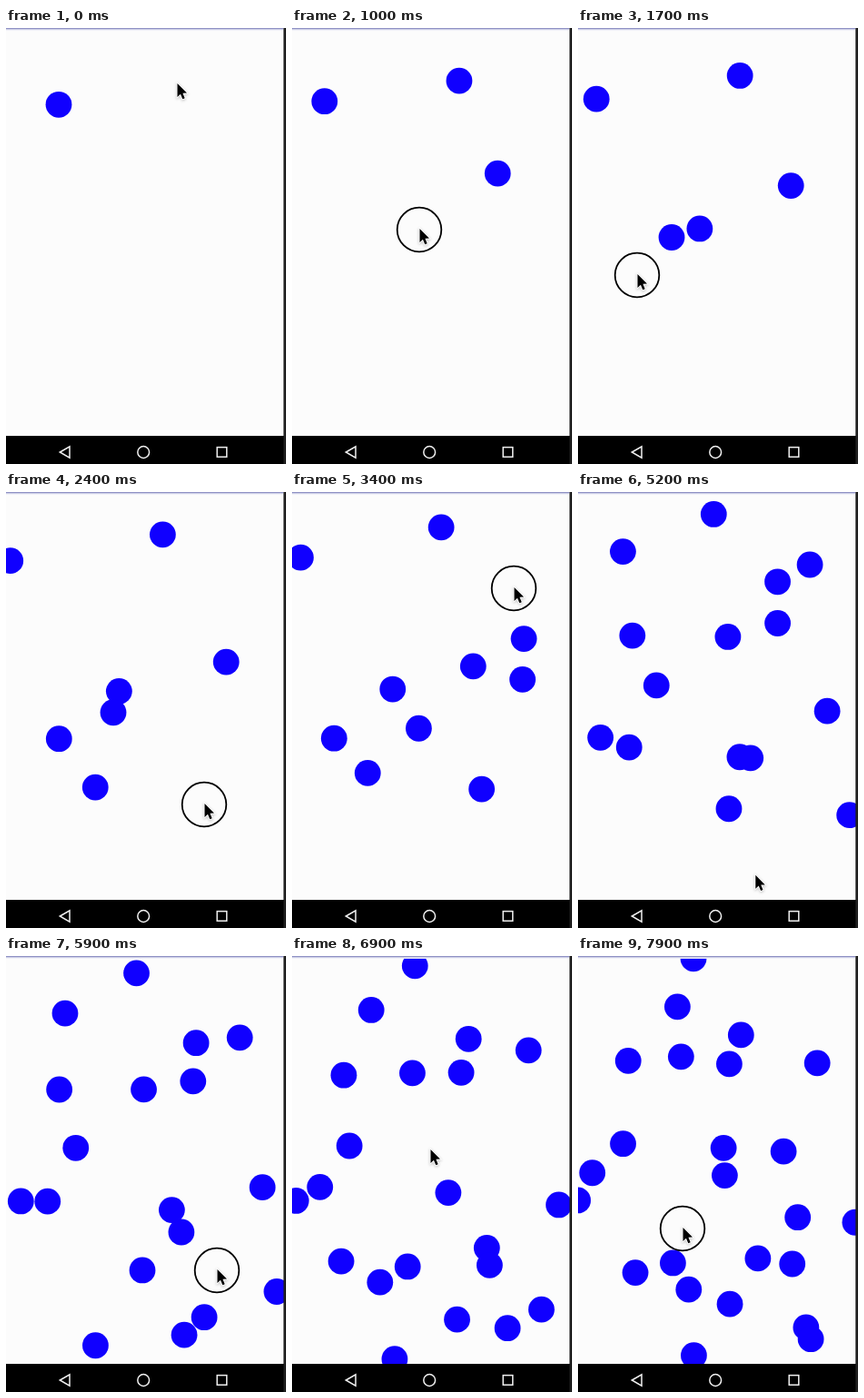
Write an HTML page with a canvas that moves like this. It is 308 px wide and 480 px high and loops after 8000 ms.

```html
<!DOCTYPE html>
<html lang="en">
<head>
<meta charset="utf-8">
<title>Tap to add balls</title>
<style>
html, body { margin: 0; width: 100%; height: 100%; overflow: hidden; background: #fcfcfc; }
canvas { display: block; }
</style>
</head>
<body>
<canvas id="stage" width="308" height="480"></canvas>
<script>
const ctx = document.getElementById('stage').getContext('2d');
const LOOP = 8000, STEP = 100;
const LAG = 0.3;    // seconds from a press to the ball's appearance
const HOLD = 0.2;   // seconds the touch ring stays
const REST = 0.05;  // the pointer arrives this long before the press

// About three taps a second, in a slightly uneven rhythm.
const pressTime = n => n / 3 - 0.1 - 0.05 * Math.cos(n * Math.PI / 3);

// Each tap: where the pointer presses, and the new ball's velocity in px/s.
const tap = (x, y, vx = 12, vy = 12) => ({ x, y, vx, vy });
const taps = [
  tap(188, 62, -8.25, -8), tap(225, 158, 11.4, 19.3), tap(140, 222, -13.6, -2.3),
  tap(100, 228, 21.4, 17.5), tap(65, 272, -12, -0.5), tap(102, 329, -15, -15.7),
  tap(218, 344, -10.5, -19), tap(209, 201, -19.1, -18), tap(258, 163, -19.7, -9.5),
  tap(244, 106, -14.9, -4.4), tap(251, 61, 3, 14), tap(274, 335, 23.5, 19.7),
  tap(61, 169, -1.7, -15.8), tap(173, 350, -22.8, -4), tap(89, 419, 14.5, 15),
  tap(201, 423, -14.5, -17), tap(217, 397, 19, 12), tap(232, 346, -19.5, -7.5),
  tap(87, 356, 25, 8), tap(54, 336, 9, 12.5), tap(152, 214, 12.5, -4),
  tap(222, 211), tap(241, 287), tap(115, 300)
].map((p, i) => ({ ...p, press: pressTime(i + 1), born: pressTime(i + 1) + LAG }));
const balls = [{ ...tap(58, 84.3, -22.2, -3.6), born: 0 }, ...taps];

const clamp = v => Math.min(1, Math.max(0, v));
const bounce = (p, lo, hi) => p < lo ? 2 * lo - p : p > hi ? 2 * hi - p : p;

function rect(color, x, y, w, h) {
  ctx.fillStyle = color;
  ctx.fillRect(x, y, w, h);
}

function circle(x, y, r) {
  ctx.beginPath();
  ctx.arc(x, y, r, 0, 2 * Math.PI);
}

function polygon(...points) {
  ctx.beginPath();
  points.forEach(([x, y]) => ctx.lineTo(x, y));
  ctx.closePath();
}

function drawBalls(t) {
  ctx.fillStyle = '#1000ff';
  for (const b of balls.filter(b => b.born <= t)) {
    const age = t - b.born;
    circle(bounce(b.x + b.vx * age, -4, 306.5), bounce(b.y + b.vy * age, -4, 449.2), 14.4);
    ctx.fill();
  }
}

function drawBars() {
  rect('#9193c6', 0, 0, 305, 1);
  rect('#c9cbe4', 0, 1, 305, 1);
  rect('#f0f0f8', 0, 2, 305, 1);
  rect('#000', 0, 449, 308, 31);
  rect('#1f1f1f', 305.3, 0, 3, 480);
  ctx.strokeStyle = '#f0f0f0';
  ctx.lineWidth = 1.5;
  polygon([59.3, 467], [70, 460.8], [70, 473.2]);
  ctx.stroke();
  circle(151.2, 467, 6.4);
  ctx.stroke();
  ctx.strokeRect(232.2, 461.6, 10.6, 10.6);
}

function drawArrow(x, y) {
  ctx.save();
  ctx.translate(x + 0.5, y - 1);
  ctx.scale(0.93, 0.93);
  polygon([0, 0], [0, 16], [3.7, 12.6], [6.2, 18.6], [8.8, 17.5], [6.4, 11.6], [11.3, 11.4]);
  ctx.strokeStyle = '#fff';
  ctx.lineWidth = 2;
  ctx.shadowColor = 'rgba(0,0,0,.25)';
  ctx.shadowBlur = 3;
  ctx.shadowOffsetY = 1;
  ctx.stroke();
  ctx.shadowColor = 'transparent';
  ctx.fillStyle = '#000';
  ctx.fill();
  ctx.restore();
}

function drawPointer(t) {
  const i = Math.max(0, taps.findLastIndex(p => p.press <= t));
  const from = taps[i], to = taps[i + 1] || from;
  const release = from.press + HOLD;
  const k = clamp((t - release) / Math.max(0.01, to.press - REST - release));
  const ease = k * k * (3 - 2 * k);
  const x = from.x + (to.x - from.x) * ease;
  const y = from.y + (to.y - from.y) * ease;

  if (t >= from.press && t < release) {
    ctx.strokeStyle = '#000';
    ctx.lineWidth = 1.8;
    circle(x, y, 24.3);
    ctx.stroke();
  }
  drawArrow(x, y);
}

function draw(now) {
  const t = Math.floor(now % LOOP / STEP) * STEP / 1000;
  rect('#fcfcfc', 0, 0, 308, 480);
  drawBalls(t);
  drawBars();
  drawPointer(t);
  requestAnimationFrame(draw);
}
requestAnimationFrame(draw);
</script>
</body>
</html>
```
